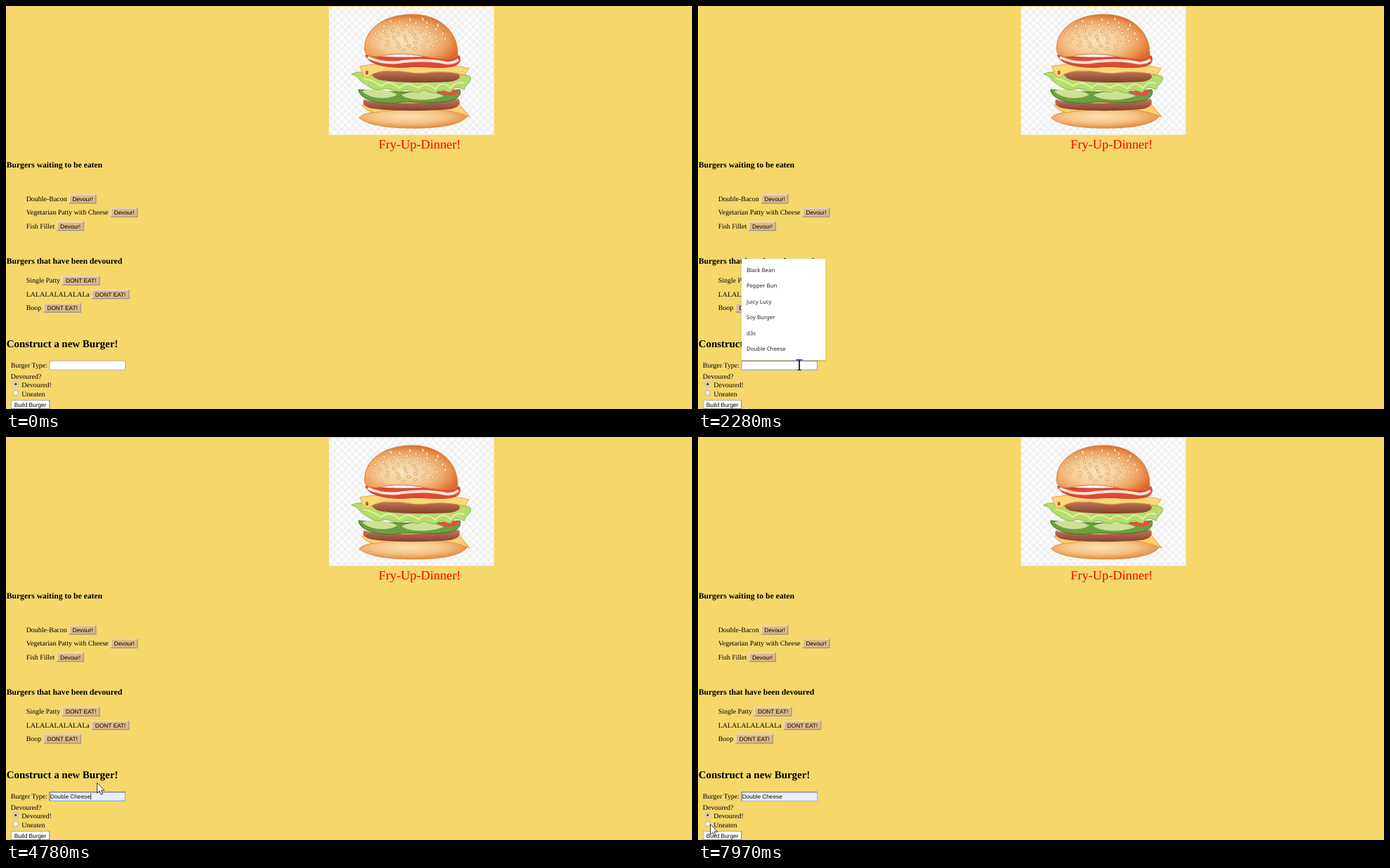
Write an HTML page that moves like this. It is 975 px wide and 574 px high and loops after 8 s.

```html
<!DOCTYPE html>
<html lang="en">
<head>
<meta charset="utf-8">
<title>Burger list</title>
<style>
html, body { margin: 0; width: 100%; height: 100%; overflow: hidden; background: #f5d76a; }
svg { display: block; }
text { text-rendering: geometricPrecision; white-space: pre; }
.serif { font-family: "Liberation Serif", "Times New Roman", serif; font-size: 9.95px; }
.h3 { font-size: 11.63px; font-weight: bold; }
.h2 { font-size: 14.92px; font-weight: bold; }
.title { font-size: 18.3px; fill: #f00; }
.sans { font-family: "Liberation Sans", Arial, sans-serif; font-size: 8.28px; }
.menu { font-family: "Noto Sans", "Open Sans", sans-serif; font-size: 7.85px; fill: #222; }
</style>
</head>
<body>
<svg id="stage" width="975" height="574" viewBox="0 0 975 574">
  <defs>
    <pattern id="checks" x="459" y="1" width="10.4" height="10.4" patternUnits="userSpaceOnUse">
      <rect width="10.4" height="10.4" fill="#fbfbfb"/>
      <path d="M0 0h5.2v10.4h5.2v-5.2h-10.4z" fill="#f0f0f0"/>
    </pattern>
    <radialGradient id="crust" cx=".42" cy=".6" r=".62">
      <stop offset="0" stop-color="#fae3bd"/>
      <stop offset=".45" stop-color="#f5cb94"/>
      <stop offset=".75" stop-color="#eda05c"/>
      <stop offset="1" stop-color="#dc6a2c"/>
    </radialGradient>
    <radialGradient id="base" cx=".45" cy=".4" r=".6">
      <stop offset="0" stop-color="#fbe0b2"/>
      <stop offset=".55" stop-color="#f5c486"/>
      <stop offset="1" stop-color="#e48a3e"/>
    </radialGradient>
    <linearGradient id="meat" x2="0" y2="1">
      <stop offset="0" stop-color="#c47a5c"/>
      <stop offset="1" stop-color="#85402c"/>
    </linearGradient>
    <filter id="shade" x="-10%" y="-10%" width="120%" height="120%">
      <feDropShadow dx="0" dy="1" stdDeviation="1.2" flood-opacity=".35"/>
    </filter>
  </defs>
  <rect width="975" height="574" fill="#f5d76a"/>
  <rect x="459" y="1" width="234.5" height="182.5" fill="url(#checks)"/>

  <g id="burger">
    <path d="M502 159C516 143 630 142 657 155C650 168 622 174 580 174C540 174 512 169 502 159Z" fill="url(#base)" stroke="#e08a42"/>
    <path d="M506 141C545 138 615 136 643 138L659 158C640 150 622 147 602 148C570 149 545 147 524 152C515 150 509 146 506 141Z" fill="#fad070" stroke="#e99a3c"/>
    <path d="M509 133C530 141 610 140 643 132C648 139 643 145 630 147C595 150 550 150 521 146C510 144 505 139 509 133Z" fill="url(#meat)"/>
    <path d="M501 119C520 122 610 125 645 119C648 127 642 134 626 136C600 140 575 134 556 138C532 140 503 135 501 119Z" fill="#6d9f40" stroke="#3c7022"/>
    <path d="M506 121C522 117 545 119 556 126C545 134 516 133 506 121ZM562 127C580 118 607 121 622 128C606 135 575 136 562 127Z" fill="#cfe093"/>
    <path d="M614 123C624 118 638 118 643 121C642 128 629 131 614 123Z" fill="#de5340"/>
    <path d="M491 97C503 91 518 95 532 99H640C648 97 656 98 660 101C663 109 650 113 652 119C642 116 639 113 632 123C622 122 618 115 611 124C600 124 595 116 587 123C575 124 571 115 561 122C550 122 544 115 533 119C522 121 513 113 506 108C501 105 502 100 491 97Z" fill="#b7dc6c" stroke="#86b744"/>
    <path d="M508 103Q522 106 533 114Q546 104 559 117Q570 106 586 117Q597 107 610 118Q621 105 632 117Q639 106 651 110" fill="none" stroke="#e0f0ac" stroke-width="2"/>
    <path d="M523 91C550 95 615 92 641 95C650 101 643 107 628 108C590 110 550 109 530 105C520 102 517 95 523 91Z" fill="url(#meat)"/>
    <path d="M503 86C535 79 625 80 658 89L652 98C630 93 614 93 598 95C580 98 569 92 547 92C533 92 521 95 514 102C506 100 506 93 503 86Z" fill="#fbd878" stroke="#eb9f43"/>
    <ellipse cx="513" cy="95" rx="2" ry="3" fill="#b06030"/>
    <path d="M511 70C545 76 615 72 644 71C648 79 643 86 628 87C607 89 589 85 572 87C545 89 515 84 511 70Z" fill="#e0492f" stroke="#c63825"/>
    <path d="M514 73Q538 84 565 79Q600 75 625 81Q637 82 643 76" fill="none" stroke="#fae4d4" stroke-width="4"/>
    <path d="M510 64C507 33 538 12 577 12C617 12 643 37 642 70C640 77 620 76 601 73C575 68 559 67 540 70C522 74 512 73 510 64Z" fill="url(#crust)" stroke="#d8793c"/>
  </g>

  <text class="serif title" x="588" y="203" text-anchor="middle">Fry-Up-Dinner!</text>
  <g id="page"></g>

  <rect id="field" x="62" y="505.7" width="107.4" height="12.6"/>
  <path id="bevel" d="M62 518.3V505.9H169.4" fill="none" stroke="#777"/>
  <text id="value" class="sans" x="62.8" y="515.1" fill="#111">Double Cheese</text>
  <path id="caret" stroke="#000" stroke-width=".8"/>

  <g id="popup">
    <rect x="61.7" y="360" width="119.6" height="144.3" rx="1" fill="#fff" filter="url(#shade)"/>
    <rect id="hover" x="61.7" y="477" width="119.6" height="22.4" fill="#ececec"/>
  </g>
  <g id="arrow">
    <path d="M.5 .5V15.3L3.9 12.2L6.1 17.3L8.4 16.3L6.2 11.3H10.9Z" fill="#fff" stroke="#222" stroke-width=".9"/>
  </g>
  <g id="ibeam" fill="none" stroke="#111">
    <path d="M0-6.5V7.5" stroke-width="1.7"/>
    <path d="M-4.5-7H4.5" stroke="#2b2f9c" stroke-width="1.6"/>
    <path d="M-3 7.5H3"/>
  </g>
</svg>
<script>
const $ = id => document.getElementById(id);

function add(parent, tag, attrs, label) {
  const el = document.createElementNS("http://www.w3.org/2000/svg", tag);
  for (const key in attrs) el.setAttribute(key, attrs[key]);
  if (label) el.textContent = label;
  return parent.appendChild(el);
}

const page = $("page");
const write = (x, y, label, kind = "") => add(page, "text", { x, y, class: "serif " + kind }, label);

function button(x, y, w, label, fill, light, dark) {
  const h = 13.3;
  add(page, "rect", { x, y, width: w, height: h, fill });
  const edge = { fill: "none", "stroke-width": 1.2 };
  add(page, "path", { ...edge, d: `M${x + .6} ${y + h}V${y + .6}H${x + w}`, stroke: light });
  add(page, "path", { ...edge, d: `M${x} ${y + h - .6}H${x + w - .6}V${y}`, stroke: dark });
  add(page, "text", { x: x + w / 2, y: y + 9.6, class: "sans", "text-anchor": "middle" }, label);
}

function list(top, action, w, rows) {
  rows.forEach(([name, x], i) => {
    const y = top + i * 19.4;
    write(28.7, y, name);
    button(x, y - 9.8, w, action, "#deb887", "#eee3d2", "#98948d");
  });
}

write(.7, 230, "Burgers waiting to be eaten", "h3");
list(278, "Devour!", 38.6, [["Double-Bacon", 89.7], ["Vegetarian Patty with Cheese", 148.7], ["Fish Fillet", 72.2]]);
write(.7, 367, "Burgers that have been devoured", "h3");
list(394.4, "DONT EAT!", 53.6, [["Single Patty", 79.8], ["LALALALALALALa", 121.7], ["Boop", 53.3]]);
write(.7, 486.2, "Construct a new Burger!", "h2");
write(6.8, 514.9, "Burger Type:");
write(6.8, 530.6, "Devoured?");
write(22.3, 543, "Devoured!");
write(22.3, 555.5, "Uneaten");
for (const cy of [538.6, 551])
  add(page, "circle", { cx: 13.8, cy, r: 3.7, fill: "#f2f2f2", stroke: "#a5a5a5", "stroke-width": .8 });
add(page, "circle", { cx: 13.8, cy: 538.6, r: 1.9, fill: "#4a4a4a" });
button(6.9, 561, 55.4, "Build Burger", "#fff", "#b4b4b4", "#8a8a8a");

["Black Bean", "Pepper Bun", "Juicy Lucy", "Soy Burger", "d3s", "Double Cheese"].forEach((name, i) =>
  add($("popup"), "text", { x: 69, y: 379 + i * 22.4, class: "menu" }, name));

// Sesame seeds on a sunflower spiral
for (let i = 0; i < 46; i++) {
  const a = i * 2.4, r = Math.sqrt((i + .5) / 46);
  const x = 574 + 54 * r * Math.cos(a), y = 41 + 24 * r * Math.sin(a);
  add($("burger"), "ellipse", {
    rx: 2.8, ry: 1.5, fill: "#fbe9c6", stroke: "#c98850", "stroke-width": .7,
    transform: `translate(${x} ${y}) rotate(${i * 67 % 180})`
  });
}

// Pointer moves: first step, last step, step count, start, bend, end
const moves = [
  [210, 970, 11, 925, 596, 430, 535, 192, 523],
  [1050, 1440, 6, 192, 523, 168, 519, 144, 511],
  [3990, 4230, 4, 144, 511, 133.5, 498.5, 129, 492],
  [5330, 5870, 8, 129, 492, 175, 508, 204, 538],
  [6020, 6020, 1, 204, 538, 204, 536, 204, 533],
  [6100, 6330, 4, 204, 533, 158, 507, 109, 541],
  [6730, 7120, 6, 109, 541, 68, 538, 26, 545],
  [7270, 7350, 2, 26, 545, 23, 545, 20, 545],
  [7500, 7970, 7, 20, 545, 3.5, 551, 17, 551]
];

function pointer(t) {
  const move = moves.filter(m => t >= m[0]).pop();
  if (!move) return [990, 600];
  const [from, to, n, x0, y0, cx, cy, x1, y1] = move;
  const gap = (to - from) / (n - 1) || 1;
  const p = Math.min(n, Math.floor((t - from) / gap + 1e-6) + 1) / n, q = 1 - p;
  const bend = (a, b, c) => q * q * a + 2 * p * q * b + p * p * c;
  return [bend(x0, cx, x1), bend(y0, cy, y1)];
}

const within = (t, ...spans) => spans.some(([a, b]) => t >= a && t < b);
const show = (id, on) => $(id).setAttribute("visibility", on ? "visible" : "hidden");

function draw(t) {
  const [x, y] = pointer(t);
  const open = within(t, [1970, 4710]);
  const hover = open && y < 499;
  const filled = hover || t >= 4710;
  const focus = within(t, [1740, 5640]);
  const typing = x > 62 && x < 169 && y > 505 && y < 519;

  $("field").setAttribute("fill", filled ? "#e8f0fe" : "#fff");
  $("field").setAttribute("stroke", focus ? "#7fa3dc" : "#a9a9a9");
  $("field").setAttribute("stroke-width", focus ? 1.1 : .8);
  show("bevel", filled);
  show("value", filled);
  $("caret").setAttribute("d", `M${filled ? 120.6 : 63.6} 507.5V516.5`);
  show("caret", within(t, [1740, 2280], [2830, 3380], [3850, 4150], [4780, 5330]));
  show("popup", open);
  show("hover", hover);

  const place = `translate(${x.toFixed(1)} ${y.toFixed(1)})`;
  for (const id of ["arrow", "ibeam"]) $(id).setAttribute("transform", place);
  show("arrow", !typing);
  show("ibeam", typing);
}

const start = performance.now();
function tick() {
  draw((performance.now() - start) % 8000);
  requestAnimationFrame(tick);
}
tick();
</script>
</body>
</html>
```
